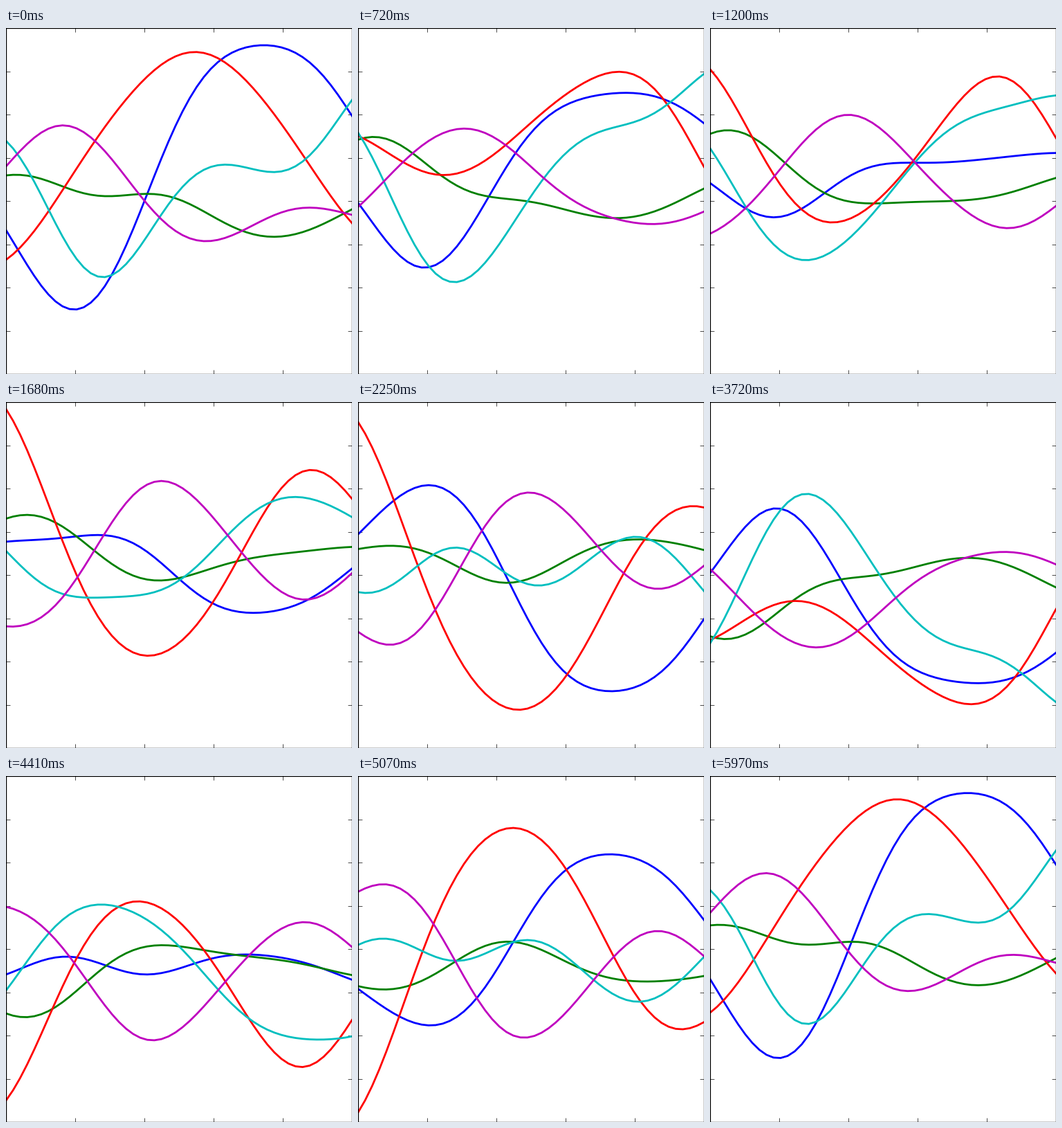
A matplotlib script for the animation above (6000 ms loop, 500 by 500 pixels).

```python
import numpy as np
import matplotlib.pyplot as plt
from matplotlib.animation import FuncAnimation

FRAMES, STEP_MS = 200, 30
UNIT = 62.5  # pixels per y unit

# Key points of each wave: complex amplitudes in pixels, evenly spaced in x
WAVES = {
    "b": [-42+41j, -145+26j, -123+35j, 36+33j, 179+0j, 224-13j, 208-0.5j, 123+33j],
    "g": [37+90j, 25+82j, 7+25j, 10-6j, -15+3j, -48+16j, -45+26j, -12+39j],
    "r": [-85+228j, 0+77j, 107-56j, 189-82j, 214-19j, 163+95j, 67+165j, -32+106j],
    "c": [87+52j, -32-30j, -110-54j, -35-32j, 45+31j, 46+101j, 57+125j, 146+113j],
    "m": [50-66j, 108-24j, 72+75j, -16+134j, -58+89j, -35+6.5j, -10-38j, -20-1j],
}


def kernel(a, b):
    """Gaussian covariance with unit length scale."""
    return np.exp(-0.5 * np.subtract.outer(a, b) ** 2)


def smooth(points, x):
    """Gaussian process mean through evenly spaced points."""
    knots = np.linspace(0, 5, len(points))
    cov = kernel(knots, knots) + 1e-5 * np.eye(len(points))
    return kernel(x, knots) @ np.linalg.solve(cov, np.array(points))


fig = plt.figure(figsize=(5, 5), dpi=100, facecolor="white")
ax = fig.add_axes([0, 0, 1, 1])
ax.set(xlim=(0, 5), ylim=(-4, 4), xticks=range(6), yticks=range(-4, 5))
ax.tick_params(direction="in", length=4, width=0.5, top=True, right=True,
               labelbottom=False, labelleft=False)
for spine in ax.spines.values():
    spine.set_linewidth(1)

x = np.linspace(0, 5, 50)
amps = [smooth(points, x) / UNIT for points in WAVES.values()]
lines = [ax.plot([], [], color=c, lw=2)[0] for c in WAVES]


def update(i):
    turn = np.exp(-2j * np.pi * i / FRAMES)
    for line, amp in zip(lines, amps):
        line.set_data(x, (amp * turn).real)
    return lines


anim = FuncAnimation(fig, update, frames=FRAMES, interval=STEP_MS,
                     repeat=True, repeat_delay=0, blit=False)
plt.show()
```
